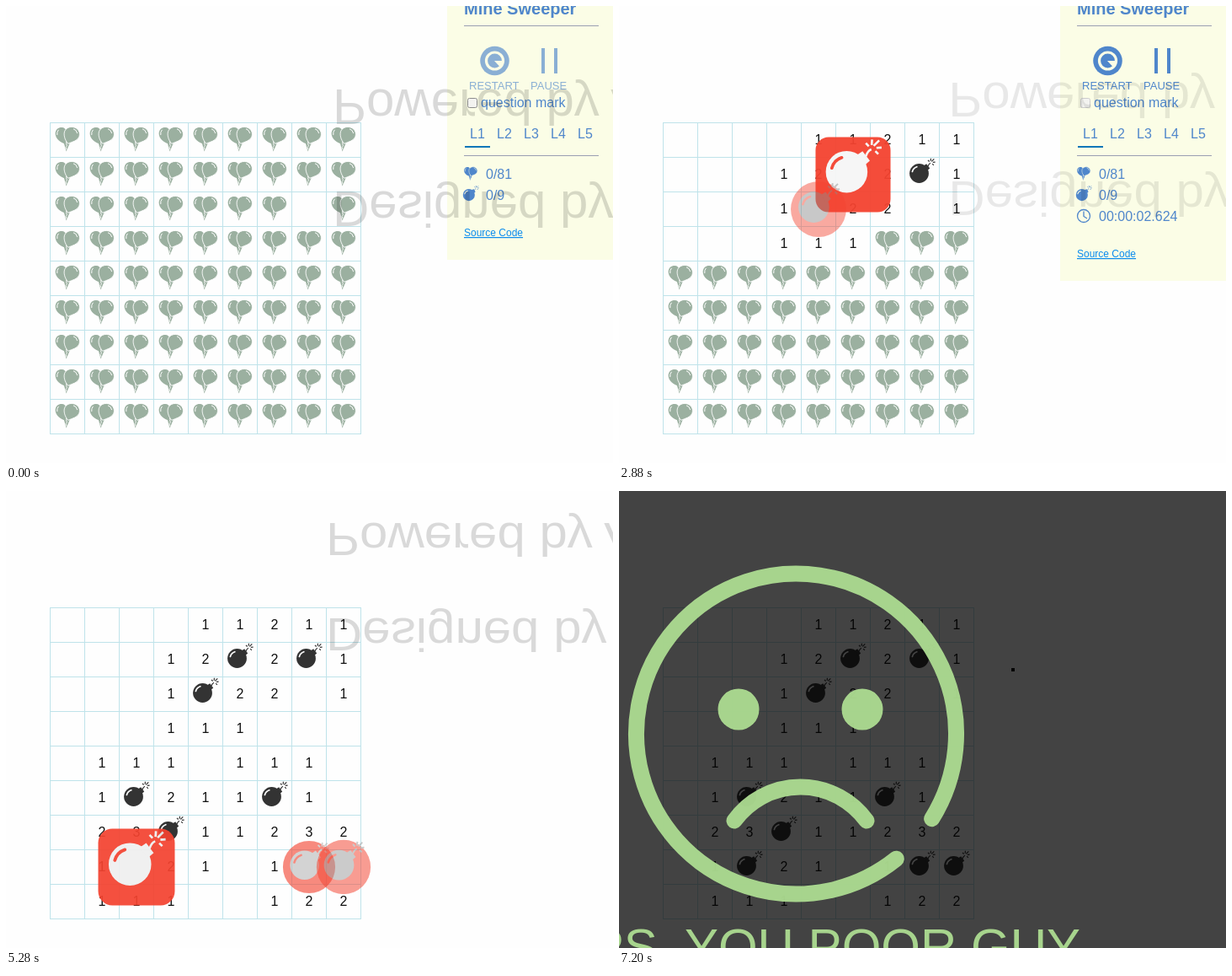
Recreate the animation shown at these times as an HTML page. Size 721 by 542 pixels, loop 7920 ms.

```html
<!DOCTYPE html>
<html lang="en">
<head>
<meta charset="utf-8">
<title>Mine Sweeper</title>
<style>
  html, body { margin: 0; width: 100%; height: 100%; overflow: hidden; background: #fefefe; }
  svg { display: block; width: 721px; height: 542px; font-family: "Liberation Sans", Arial, sans-serif; font-size: 16px; }
  .panel { fill: #4f86cb; }
  .small { font-size: 13px; }
  .num { fill: #111; text-anchor: middle; }
</style>
</head>
<body>
<svg viewBox="0 0 721 542">
  <defs>
    <mask id="shine" maskUnits="userSpaceOnUse" x="-21" y="-21" width="42" height="42">
      <rect x="-21" y="-21" width="42" height="42" fill="#fff"/>
      <path d="M-11.6 -3.6A8.4 8.4 0 0 1 -6.2 -9.3" fill="none" stroke="#000" stroke-width="1.7" stroke-linecap="round"/>
    </mask>
    <g id="bomb" stroke="none">
      <circle cx="-3.5" cy="-1.5" r="11.4" fill="currentColor" mask="url(#shine)"/>
      <path d="M1.6 -10.4L5.2 -12.8 9.2 -7.6 6 -4.8Z" fill="currentColor"/>
      <path d="M7 -10Q8 -13 10 -13.8M11.3 -15.7L14.3 -18.7M10.2 -16.2L10.4 -19.2M12.8 -14.6L15.6 -14.8M8.6 -15.5L7 -17.2M12.2 -12.8L13.8 -11.2" fill="none" stroke="currentColor" stroke-width="1.2"/>
    </g>
    <g id="balloons">
      <path d="M-4.2 4L-1.4 14L2.8 4Z" fill="currentColor"/>
      <path d="M-1.4 4.5L-.6 7.4L-1.9 9L-.8 12" fill="none" stroke="var(--gap)" stroke-width=".9"/>
      <path d="M-2.2 5C-8 4 -14.5 -1 -14.4 -7.5C-14.2 -12.5 -10 -15 -6 -14.4C-1 -13.5 1 -7 -2.2 5Z" fill="currentColor"/>
      <path d="M.8 4.8C-3.2 .5 -5 -6 -3.2 -10.3C-1 -15 5 -16 9 -14.3C14 -12.3 15.6 -7 13.6 -2.8C11.3 1.6 6 2.4 .8 4.8Z" fill="currentColor" stroke="var(--gap)" stroke-width=".9"/>
      <path d="M-10.8 -11.4Q-12.8 -9.4 -12.3 -5.8M7.4 -12.6Q11 -11.6 11.6 -7.8" fill="none" stroke="var(--gap)" stroke-width="1" stroke-linecap="round"/>
    </g>
  </defs>
  <rect width="721" height="542" fill="#fefefe"/>

  <g id="panel" class="panel">
    <rect id="sheet" x="524" width="197" height="301" fill="#fbfde6"/>
    <text x="544" y="10" font-size="20" font-weight="bold">Mine Sweeper</text>
    <path d="M544 23.5H704M544 177.5H704" stroke="#9a9fb2"/>
    <g id="tools">
      <circle cx="580.5" cy="65" r="17.3"/>
      <circle cx="580.5" cy="65" r="10" fill="none" stroke="#fbfde6" stroke-width="3.2"/>
      <path d="M580 65H592L588 73.5Z" fill="#fbfde6"/>
      <path d="M636 50h4v30h-4zM651 50h4v30h-4z"/>
      <text class="small" x="550" y="99">RESTART</text>
      <text class="small" x="623" y="99">PAUSE</text>
    </g>
    <rect id="check" x="548.5" y="109.5" width="11" height="11" rx="2" fill="#f3f3f0" stroke="#999"/>
    <text x="564" y="120">question mark</text>
    <g id="tabs"></g>
    <path d="M545 167H575" stroke="#0b76b8" stroke-width="2"/>
    <use href="#balloons" transform="translate(552 199) scale(.55)" color="#4f86cb" style="--gap:#fbfde6"/>
    <text x="570" y="205">0/81</text>
    <use href="#bomb" transform="translate(552 225) scale(.62)" color="#4f86cb"/>
    <text x="570" y="230">0/9</text>
    <g id="timer">
      <path d="M552 243.5V249.5L556 252" fill="none" stroke="#4f86cb" stroke-width="1.3"/>
      <circle cx="552" cy="249" r="7.5" fill="none" stroke="#4f86cb" stroke-width="1.3"/>
      <text id="clock" x="570" y="255"></text>
    </g>
    <text id="link" x="544" font-size="12" fill="#0a8bee" text-decoration="underline">Source Code</text>
  </g>

  <path id="grid" fill="none" stroke="#bfe3ea" shape-rendering="crispEdges"/>
  <g id="cells"></g>
  <g id="mines"></g>

  <g id="credits" font-size="60">
    <text>Powered by A</text>
    <text y="-124">Designed by</text>
  </g>

  <g id="overlay">
    <rect y="-29" width="721" height="1200" fill="#000" opacity=".733"/>
    <g fill="none" stroke="#aede92" stroke-width="19" stroke-linecap="round" opacity=".94">
      <path id="ring"/>
      <path d="M137 391A97 97 0 0 1 294 391"/>
      <g fill="#aede92" stroke="none">
        <circle cx="142" cy="259" r="24.5"/>
        <circle cx="289" cy="259" r="24.5"/>
        <text x="548" y="561" font-size="60" text-anchor="end">OOPS, YOU POOR GUY</text>
      </g>
    </g>
  </g>
  <rect id="dot" x="466" y="210" width="4" height="4" fill="#050505"/>
</svg>
<script>
const LOOP = 7920, STEP = 120, LAST = 7200, CELL = 41;
const BOARD = [
  '    11211', '   12*2*1', '   1*22 1', '   111   ', ' 111 111 ',
  ' 1*211*1 ', ' 23*11232', ' 1*21 1**', ' 111  122'
];
const FIRST_MINE = 16, CLEARED = 25;

// cells opened, time
const OPENING = [[0, 1370], [9.5, 1800], [33.5, 2880], [65.5, 4440], [81.5, 5280]];
// age, scale, opacity, corner radius, bomb grey, red opacity
const BLAST = [
  [320, 1.9, 0, 20.5, 51, 1],
  [414, 1.76, .22, 20.5, 60, 1],
  [530, 1.59, .48, 20.5, 145, 1],
  [650, 1.47, .7, 20.5, 210, 1],
  [715, 1.46, .72, 20.5, 220, 1],
  [850, 2.27, .9, 8, 232, 1],
  [895, 2.11, .98, 6.6, 255, 1],
  [1150, 1, 1, 6.6, 51, 0]
];
// time, x, y, vertical scale, opacity
const DRIFT = [
  [0, 388, 98.5, .98, .14], [840, 384, 98.5, .98, .13], [1680, 392, 91.5, .94, .08],
  [2640, 392, 91.5, .94, .08], [3360, 390, 89, .96, .09], [4200, 387, 79.5, .98, .11],
  [4440, 387, 71.5, .99, .12], [5040, 382, 49, .94, .14], [5280, 380, 38, .915, .14],
  [6240, 367, 8, .6, .07], [6480, 363, 0, .4, 0]
];

const $ = id => document.getElementById(id);
const show = (node, on) => node.setAttribute('display', on ? 'inline' : 'none');
const clamp = (v, a = 0, b = 1) => Math.min(b, Math.max(a, v));

function add(parent, tag, attrs, text) {
  const node = document.createElementNS('http://www.w3.org/2000/svg', tag);
  set(node, attrs);
  if (text) node.textContent = text;
  return parent.appendChild(node);
}

function set(node, attrs) {
  for (const key in attrs) node.setAttribute(key, attrs[key]);
}

// Linear lookup in a table whose first column is the position.
function at(table, v) {
  let i = 1;
  while (i < table.length - 1 && v > table[i][0]) i++;
  const a = table[i - 1], b = table[i];
  const p = clamp((v - a[0]) / (b[0] - a[0]));
  return a.slice(1).map((n, k) => n + (b[k + 1] - n) * p);
}

let lines = '';
for (let i = 0; i < 10; i++) {
  const d = i * CELL;
  lines += `M${52.5 + d} 138V508M52 ${138.5 + d}H422`;
  if (i > 0 && i < 6) add($('tabs'), 'text', { x: 519 + i * 32, y: 157 }, 'L' + i);
}
$('grid').setAttribute('d', lines);

const polar = deg => {
  const a = deg * Math.PI / 180;
  return `${210.5 + 190 * Math.cos(a)} ${288 + 190 * Math.sin(a)}`;
};
$('ring').setAttribute('d', `M${polar(51.3)}A190 190 0 1 1 ${polar(32)}`);

const cells = [...BOARD.join('')].map((mark, i) => {
  const x = 73 + i % 9 * CELL, y = 159 + Math.floor(i / 9) * CELL;
  const cell = { x, y, birth: at(OPENING, i)[0], open: at(OPENING, i + 1)[0] };
  if (i === FIRST_MINE) { cell.birth = 1335; cell.open = 1400; }
  if (i === CLEARED) cell.open = -1;
  cell.cover = add($('cells'), 'use', {
    href: '#balloons', transform: `translate(${x} ${y - .5})`, color: '#9bb0a0', style: '--gap:#fefefe'
  });
  if (mark === '*') {
    cell.mine = add($('mines'), 'g', {});
    cell.red = add(cell.mine, 'rect', { x: -20.5, y: -20.5, width: 41, height: 41, fill: '#f44330' });
    add(cell.mine, 'use', { href: '#bomb' });
  } else if (mark !== ' ') {
    cell.face = add($('cells'), 'text', { x, y: y + 5, class: 'num' }, mark);
  }
  return cell;
});

function drawCell(cell, t) {
  const open = t >= cell.open;
  show(cell.cover, !open);
  if (cell.face) show(cell.face, open);
  if (!cell.mine) return;
  const [scale, opacity, rx, grey, red] = at(BLAST, t - cell.birth);
  show(cell.mine, open && opacity > 0);
  set(cell.mine, {
    transform: `translate(${cell.x} ${cell.y}) scale(${scale})`,
    opacity, color: `rgb(${grey},${grey},${grey})`
  });
  set(cell.red, { rx, opacity: red });
}

function drawPanel(t) {
  show($('panel'), t < 5160);
  const running = t >= 1560;
  const ms = Math.round(clamp((t - 1561.3) * 1.99, 0, 3225));
  $('clock').textContent = `00:00:0${Math.floor(ms / 1000)}.${String(ms % 1000).padStart(3, '0')}`;
  show($('timer'), running);
  $('sheet').setAttribute('height', running ? 326 : 301);
  $('link').setAttribute('y', running ? 298 : 273);
  $('tools').setAttribute('opacity', .65 + .35 * clamp((t - 1080) / 480));
  $('check').setAttribute('stroke', running ? '#ccc' : '#8c8c8c');
}

function draw(t) {
  cells.forEach(cell => drawCell(cell, t));
  drawPanel(t);

  const [x, y, k, opacity] = at(DRIFT, t);
  set($('credits'), { transform: `translate(${x} ${y}) scale(1 ${-k})`, opacity });

  const drop = 600 * (1 - clamp((t - 5467) / 1733)) ** 3;
  show($('overlay'), t > 5467);
  $('overlay').setAttribute('transform', `translate(0 ${drop})`);
  show($('dot'), drop - 29 < 212);
}

function tick() {
  const t = performance.now() % LOOP;
  draw(Math.min(LAST, Math.floor(t / STEP) * STEP));
  requestAnimationFrame(tick);
}
tick();
</script>
</body>
</html>
```
